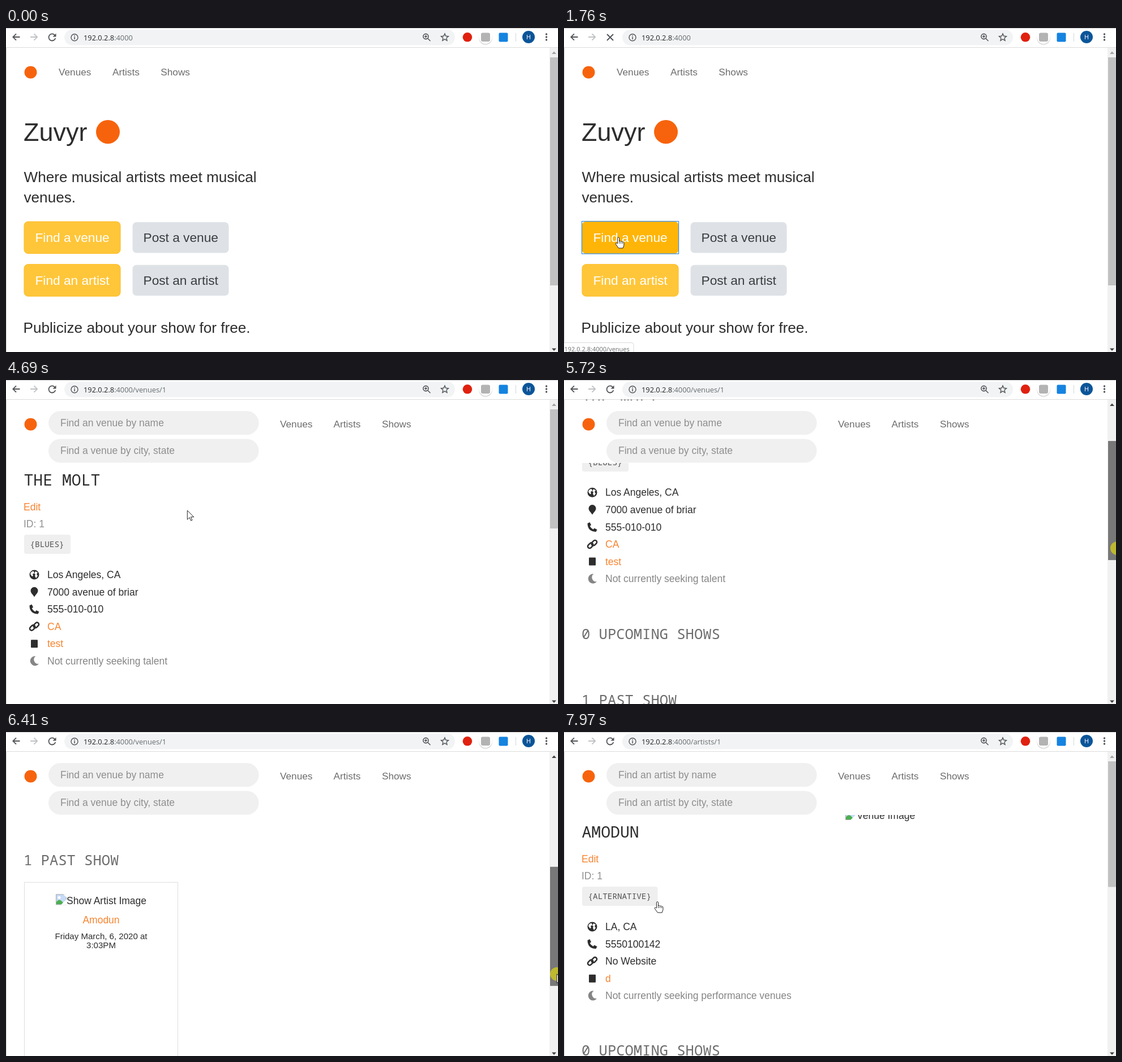
These frames come from a looping animation (975 px wide and 574 px high, 8000 ms). An HTML page:

```html
<!DOCTYPE html>
<html lang="en">
<head>
<meta charset="utf-8">
<title>Venue browser</title>
<style>
html, body { margin: 0; width: 100%; height: 100%; overflow: hidden; background: #fff; }
svg { display: block; font-family: "Liberation Sans", Arial, sans-serif; }
.ui { font-family: "Open Sans", sans-serif; }
.mono { font-family: "Noto Sans Mono", monospace; }
</style>
</head>
<body>
<svg id="stage" width="975" height="574" viewBox="0 0 975 574"></svg>
<script>
const LOOP = 8000, STEP = 75.8;
const HOST = '192.0.2.8', PORT = ':4000';
const INK = '#2d2d2d', GREY = '#6c6c6c', LINK = '#f9832f', HOVER = '#fb9c12', FLAME = '#f7630c';

const within = (t, spans) => spans.some(([a, b]) => t >= a && t < b);

// Linear interpolation through keys [time, value, value, ...]
function at(keys, t) {
  if (t <= keys[0][0]) return keys[0].slice(1);
  const i = keys.findIndex(k => k[0] > t);
  if (i < 0) return keys[keys.length - 1].slice(1);
  const a = keys[i - 1], b = keys[i], f = (t - a[0]) / (b[0] - a[0]);
  return a.slice(1).map((v, n) => v + (b[n + 1] - v) * f);
}

// Drawing helpers
const text = (x, y, size, str, fill = INK, more = '') =>
  `<text x="${x}" y="${y}" font-size="${size}" fill="${fill}" ${more}>${str}</text>`;
const mono = (x, y, size, str, fill) => text(x, y, size, str, fill, 'class="mono"');
const ui = (x, y, size, str, fill, more = '') => text(x, y, size, str, fill, 'class="ui" ' + more);
const mid = (x, y, size, str, fill) => text(x, y, size, str, fill, 'text-anchor="middle"');
const rect = (x, y, w, h, fill, rx = 0, more = '') =>
  `<rect x="${x}" y="${y}" width="${w}" height="${h}" rx="${rx}" fill="${fill}" ${more}/>`;
const disc = (x, y, r, fill, more = '') => `<circle cx="${x}" cy="${y}" r="${r}" fill="${fill}" ${more}/>`;
const path = (d, fill, more = '') => `<path d="${d}" fill="${fill}" ${more}/>`;
const line = (d, stroke, w = 2) => path(d, 'none', `stroke="${stroke}" stroke-width="${w}"`);
const move = (x, y, body) => `<g transform="translate(${x} ${y})">${body}</g>`;

const icons = {
  globe: disc(0, 0, 8.5, INK) +
    path('M-6-4Q-3-7-1-6L0-3-3-1-2 2-4 3-7-1zM2-6 6-4 4-1 6 2 3 6 1 2 2-1 0-2z', '#fff'),
  pin: path('M0 9C-2 5-6.5 2-6.5-2.3a6.5 6.5 0 0 1 13 0C6.5 2 2 5 0 9z', INK),
  phone: path('M-8.5-6.5-4.5-8.5-2-3.5-4.3-1.6Q-2.5 2.3 1.6 4.3L3.5 2 8.5 4.5 6.5 8.5Q-8.5 8-8.5-6.5z', INK),
  chain: `<g transform="rotate(-45)" fill="none" stroke="${INK}" stroke-width="2.5">
    <rect x="-9.3" y="-4" width="10.6" height="6.6" rx="3.3"/><rect x="-1.3" y="-2.6" width="10.6" height="6.6" rx="3.3"/></g>`,
  social: rect(-6, -7, 12, 14, INK, 1),
  moon: path('M2.5-8.5A8.5 8.5 0 1 0 8 5 7.5 7.5 0 0 1 2.5-8.5z', '#858585'),
  notes: line('M-3.2 6V-5.5L8-8.5V4', '#000', 2) + path('M-4-6 9-9.5V-5L-4-1.5z', '#000') +
    '<ellipse cx="-5.6" cy="6.4" rx="3.5" ry="2.8"/><ellipse cx="5.4" cy="4.2" rx="3.5" ry="2.8"/>',
  broken: rect(.5, .5, 18, 18, '#c6daf6', 0, 'stroke="#aaa"') + disc(6, 6, 2.5, '#fff') +
    path('M1 18V14Q6 7 11 13L15 18z', '#4caf50') + path('M19 9V19H9z', '#fff') + path('M13 0h6v6z', '#fff'),
};

const nav = (xs, active) => disc(43.5, 78.5, 11, FLAME) +
  ['Venues', 'Artists', 'Shows'].map((s, i) =>
    text(xs[i], 84, 17.2, s, s === active ? '#000' : GREY, s === active ? 'font-weight="bold"' : '')).join('');

const pill = (y, str) => rect(75, y, 371.5, 42, '#f0f0f0', 21) + text(96, y + 26.5, 17.5, str, '#8e8e8e');

const header = (byName, byCity, xs, active) =>
  rect(1, 36, 959, 111, '#fff') + nav(xs, active) + pill(55, byName) + pill(104.5, byCity);

const venueHeader = (xs, active) => header('Find an venue by name', 'Find a venue by city, state', xs, active);
const PLAIN = [484, 578.5, 664];

function home(t) {
  const hot = t >= 1280;
  const find = (y, str, on) => rect(32, y, 170, 56.5, on ? '#ffb508' : '#ffc63a', 7, 'stroke="#fbbc22"') +
    text(51.5, y + 36, 22.7, str, '#fff');
  const post = (y, str) => rect(223.5, y, 170, 54.5, '#dee2e6', 7) + text(242.5, y + 35, 22.7, str, '#3a3d40');
  return nav([93, 188, 273.3]) +
    text(31, 200, 45, 'Zuvyr') + disc(180, 184, 21, FLAME) +
    text(31.5, 272.5, 26.15, 'Where musical artists meet musical') + text(31.5, 309, 26.15, 'venues.') +
    find(343, 'Find a venue', hot) + post(344, 'Post a venue') +
    find(418.7, 'Find an artist') + post(419.8, 'Post an artist') +
    (t >= 1680 ? rect(31.5, 342.5, 171, 57.5, 'none', 0, 'stroke="#3b8ee8" stroke-width="1.3"') : '') +
    text(30.5, 539.5, 26.15, 'Publicize about your show for free.');
}

const venues = t => venueHeader([484, 581.5, 667], 'Venues') +
  text(30.5, 179.5, 29.7, 'Los Angeles, CA') + move(53, 221, icons.notes) +
  text(79.5, 225.7, 17.5, 'The molt', t >= 2600 ? HOVER : LINK) +
  text(31, 528, 17.35, 'Zuvyr © All Rights Reserved.');

// rows: [icon, label, colour]
const profile = (title, tag, rows) => mono(31.5, 187, 28.1, title) +
  text(31, 231, 17.5, 'Edit', LINK) + text(31, 261, 17.5, 'ID: 1', '#909090') +
  rect(32, 274, 22 + tag.length * 8.58, 34, '#efefef', 4) + mono(42.5, 296.3, 14.3, tag, '#555') +
  rows.map(([icon, label, fill], i) => move(50, 345 + i * 30.55, icons[icon]) +
    text(73, 351.2 + i * 30.55, 17.5, label, fill)).join('');

const venue = (t, scroll) => move(0, -scroll,
  profile('THE MOLT', '{BLUES}', [
    ['globe', 'Los Angeles, CA'], ['pin', '7000 avenue of briar'], ['phone', '555-010-010'],
    ['chain', 'CA', LINK], ['social', 'test', LINK], ['moon', 'Not currently seeking talent', '#858585']]) +
  mono(31, 604.5, 25.5, '0 UPCOMING SHOWS', GREY) + mono(31, 721.5, 25.5, '1 PAST SHOW', GREY) +
  rect(32.5, 752, 271, 420, 'none', 0, 'stroke="#dedede"') +
  move(88, 773, icons.broken) + text(107, 790.5, 17.5, 'Show Artist Image') +
  mid(168, 824.5, 17.5, 'Amodun', t >= 7030 ? HOVER : LINK) +
  mid(168, 852.5, 15.05, 'Friday March, 6, 2020 at') + mid(168, 868.5, 15.05, '3:03PM')) +
  venueHeader(PLAIN);

const artist = () => profile('AMODUN', '{ALTERNATIVE}', [
    ['globe', 'LA, CA'], ['phone', '5550100142'], ['chain', 'No Website'],
    ['social', 'd', LINK], ['moon', 'Not currently seeking performance venues', '#858585']]) +
  mono(31, 573, 25.5, '0 UPCOMING SHOWS', GREY) +
  move(497, 137, icons.broken) + text(517, 153.5, 17.5, 'Venue Image') +
  header('Find an artist by name', 'Find an artist by city, state', PLAIN);

// start time, address path, thumb height, painter
const pages = [
  [0, '', 404, home],
  [1830, '/venues', 0, venues],
  [3300, '/venues/1', 211, venue],
  [7580, '/artists/1', 222.5, artist],
];

function toolbar(t, route) {
  const loading = within(t, [[1760, 1910], [3230, 3380], [7510, 7650]]);
  const dark = '#505357';
  return rect(0, 0, 975, 35, '#fff') + rect(0, 0, 975, 1, '#cfcfcf') + rect(0, 34, 975, 1, '#dcdcdc') +
    line('M24.5 16H12.5M18 10.3 12.3 16 18 21.7', dark, 1.8) +
    line('M43 16H55M49.5 10.3 55.2 16 49.5 21.7', '#bfc1c4', 1.8) +
    (loading ? line('M76 11 87 22M87 11 76 22', dark, 1.9)
      : line('M86 12.5A6 6 0 1 0 87.3 18', dark, 1.8) + path('M88.5 9.5V15.5H82.5z', dark)) +
    rect(103, 3, 690, 27.5, '#f1f3f4', 13.7) +
    disc(121, 16.7, 6, 'none', `stroke="${dark}" stroke-width="1.4"`) +
    rect(120.3, 15.7, 1.5, 4.5, dark) + rect(120.3, 13, 1.5, 1.6, dark) +
    ui(137, 21.5, 12.8, `${HOST}<tspan fill="#686c70">${PORT}${route}</tspan>`, '#202124') +
    disc(741.5, 15, 4.6, 'none', `stroke="${dark}" stroke-width="1.6"`) +
    line('M745 18.5 749.5 23M739 15H744M741.5 12.5V17.5', dark, 1.5) +
    path('M775 10 776.8 14.3 781.5 14.7 778 17.8 779 22.3 775 19.9 771 22.3 772 17.8 768.5 14.7 773.2 14.3z',
      'none', `stroke="${dark}" stroke-width="1.4"`) +
    disc(815, 16.3, 8.3, '#e0210f') +
    disc(847, 17.8, 11.8, '#d4d4d4') + disc(847, 16.6, 11.5, '#fff') + rect(839, 8.5, 16, 15.5, '#b3b3b3', 3) +
    rect(870.5, 8.5, 16, 16, '#1583e0', 2) +
    rect(900, 9, 1, 15, '#d5d7da') +
    disc(923, 16, 11, '#0a5599') + ui(923, 20, 11, 'H', '#fff', 'text-anchor="middle"') +
    [11, 16, 21].map(y => disc(954.5, y, 1.7, dark)).join('');
}

function scrollbar(t, height, scroll) {
  const fill = within(t, [[5240, 6490]]) ? '#787878' : within(t, [[5100, 5240], [6490, 6600]]) ? '#a8a8a8' : '#c1c1c1';
  return rect(960, 35, 15, 539, '#f1f1f1') +
    (height ? rect(961, 52 + scroll / 2.6, 14, height, fill) : '') +
    path('M964 46 968 41.5 972 46z', scroll ? '#404040' : '#a3a3a3') +
    path('M964 567.5 968 572 972 567.5z', height ? '#404040' : '#a3a3a3');
}

// shown faint, half, full, hidden; path; bubble width
const hints = [
  [1530, 1530, 1610, 2136, '/venues', 123],
  [2690, 2840, 2930, 3616, '/venues/1', 133],
  [7260, 7260, 7350, 7970, '/artists/1', 130],
];
function status(t) {
  const hint = hints.find(h => t >= h[0] && t < h[3]);
  if (!hint) return '';
  const [, half, full, end, route, w] = hint;
  const alpha = t < half ? .06 : t < full || t >= end - 76 ? .36 : 1;
  return `<g opacity="${alpha}">` +
    path(`M0 557.5H${w - 4}Q${w} 557.5 ${w} 561.5V575H0z`, '#fff', 'stroke="#d9d9d9"') +
    ui(.5, 572.5, 11, HOST + PORT + route, '#6a6d70') + '</g>';
}

const scrollKeys = [[5240, 0], [5690, 149.5], [6360, 485.5], [6480, 515]];
const pointerKeys = [
  [600, 853, 562], [760, 640, 440], [1000, 340, 338], [1200, 150, 350], [1358, 96, 371],
  [1985, 96, 371], [2640, 134, 216], [3465, 134, 216], [3800, 118, 202], [4300, 49, 252],
  [4693, 320, 231], [5150, 972, 243], [5240, 976, 242], [5690, 977, 299.5], [6360, 973, 428.7], [6480, 972, 440],
  [6700, 700, 490], [6876, 267, 334], [7100, 165, 301],
];
const HAND = 'M-1.6 11V1.4a1.6 1.6 0 0 1 3.2 0V7c.6-1 2.5-.8 3 .5 1-.9 2.5-.5 2.9.7 1.2-.6 2.4 0 2.4 1.5v4.3l-1.8 5H.4l-5.2-7.3c-.8-1.6 1-2.6 3.2-.7z';
const ARROW = 'M0 0V16.2l3.8-3.6 2.5 5.6 2.3-1-2.4-5.5H11.5z';

function pointer(t, q) {
  if (t < 600) return '';
  const [x, y] = at(pointerKeys, q);
  const hand = within(t, [[900, 2060], [2600, 3540], [7030, LOOP]]);
  const pressed = within(t, [[1606, 1760], [3070, 3230], [5240, 6490], [7350, 7510]]);
  return move(x, y, (pressed ? disc(0, 0, 12, '#e0d60f', 'opacity=".68"') : '') +
    path(hand ? HAND : ARROW, '#fff', 'stroke="#222" stroke-width="1" stroke-linejoin="round"') +
    (hand ? line('M1.6 7V11M4.6 7.8V11M7.5 8.5V11', '#222', .9) : ''));
}

const stage = document.getElementById('stage');
function draw() {
  const t = performance.now() % LOOP;
  const q = 600 + Math.floor((t - 594) / STEP) * STEP;
  const [, route, thumb, paint] = pages.filter(p => p[0] <= t).pop();
  const scroll = paint === venue ? at(scrollKeys, q)[0] : 0;
  stage.innerHTML = rect(0, 0, 975, 574, '#fff') + paint(t, scroll) + rect(0, 35, 1, 539, '#cfcfcf') +
    toolbar(t, route) + scrollbar(t, thumb, scroll) + status(t) + pointer(t, q);
  requestAnimationFrame(draw);
}
draw();
</script>
</body>
</html>
```
